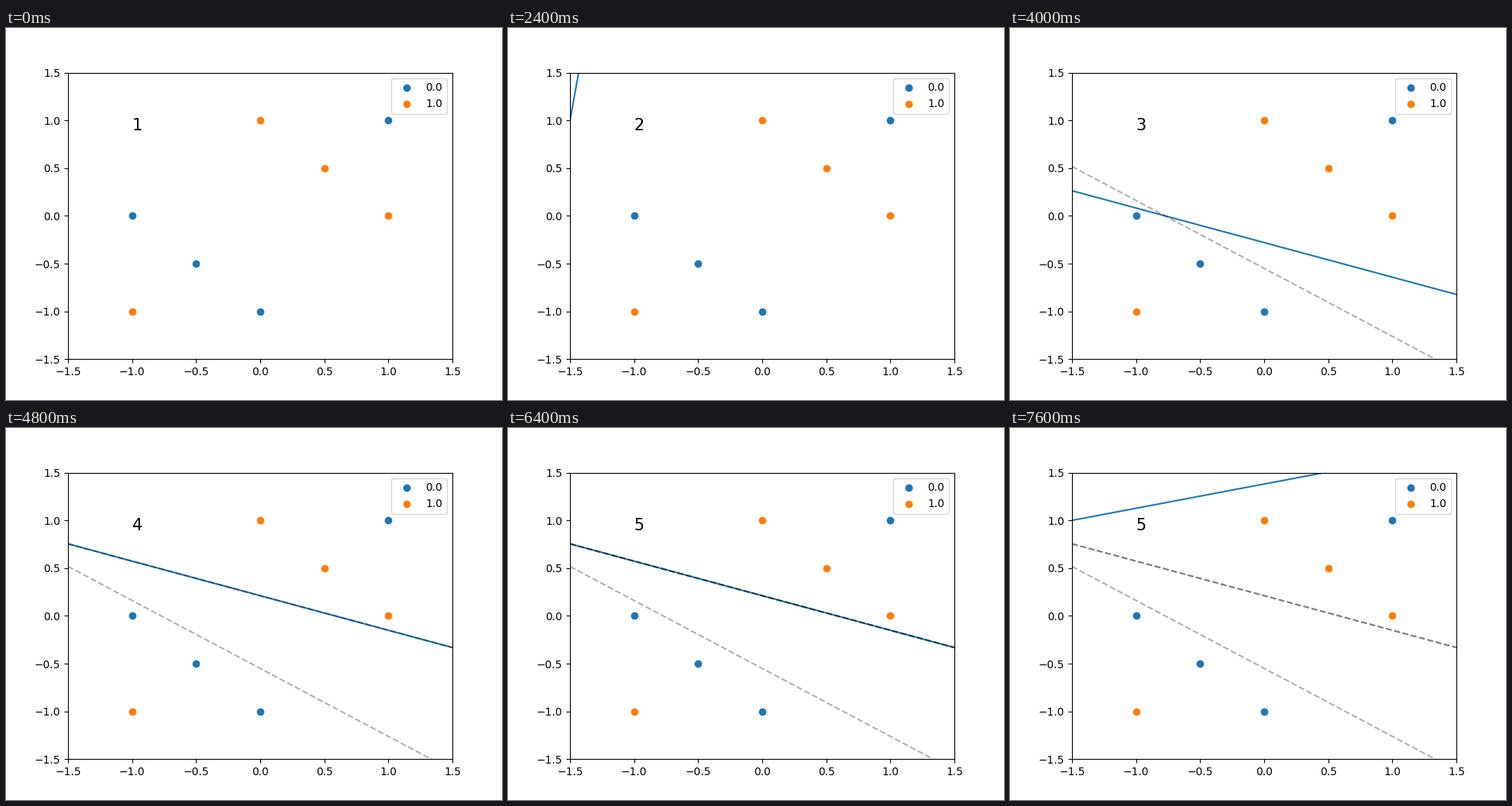
Write a matplotlib script that moves like this. It is 640 px wide and 480 px high and loops after 8 s.

```python
import numpy as np
import matplotlib.pyplot as plt
from matplotlib.animation import FuncAnimation

EPOCHS = 5
LIM = 1.5

# Training set, visited in this order: class 0 first, then class 1
X = np.array([[1, 1], [-1, 0], [0, -1], [-0.5, -0.5],
              [-1, -1], [1, 0], [0, 1], [0.5, 0.5]])
y = np.repeat([0.0, 1.0], 4)
START = np.array([0.763, 0.4645, 6.43])  # w1, w2, bias


def train():
    """Perceptron rule; returns the weights after every sample."""
    w = START.copy()
    history = []
    for _ in range(EPOCHS):
        for point, label in zip(X, y):
            sample = np.append(point, 1)
            w = w + (label - float(w @ sample > 0)) * sample
            history.append(w)
    return history


xs = np.array([-LIM, LIM])


def boundary(w):
    return -(w[0] * xs + w[2]) / w[1]


history = train()
per_epoch = len(X)

fig, ax = plt.subplots(figsize=(6.4, 4.8), dpi=100)
ax.set_xlim(-LIM, LIM)
ax.set_ylim(-LIM, LIM)
for label in np.unique(y):
    ax.scatter(*X[y == label].T, label=str(label))
ax.legend(loc="upper right")

line, = ax.plot(xs, boundary(history[0]), color="tab:blue")
counter = ax.text(-1, 0.9, "1", fontsize=15)
# One faint trace for the boundary at the start of each epoch
traces = [ax.plot(xs, boundary(w), "k--", alpha=0.3)[0]
          for w in history[::per_epoch]]


def update(i):
    epoch = i // per_epoch
    line.set_ydata(boundary(history[i]))
    counter.set_text(str(epoch + 1))
    for k, trace in enumerate(traces):
        trace.set_visible(k <= epoch)
    return [line, counter, *traces]


anim = FuncAnimation(fig, update, frames=len(history), interval=200,
                     init_func=lambda: update(0), repeat=True,
                     repeat_delay=0, blit=False)
plt.show()
```
